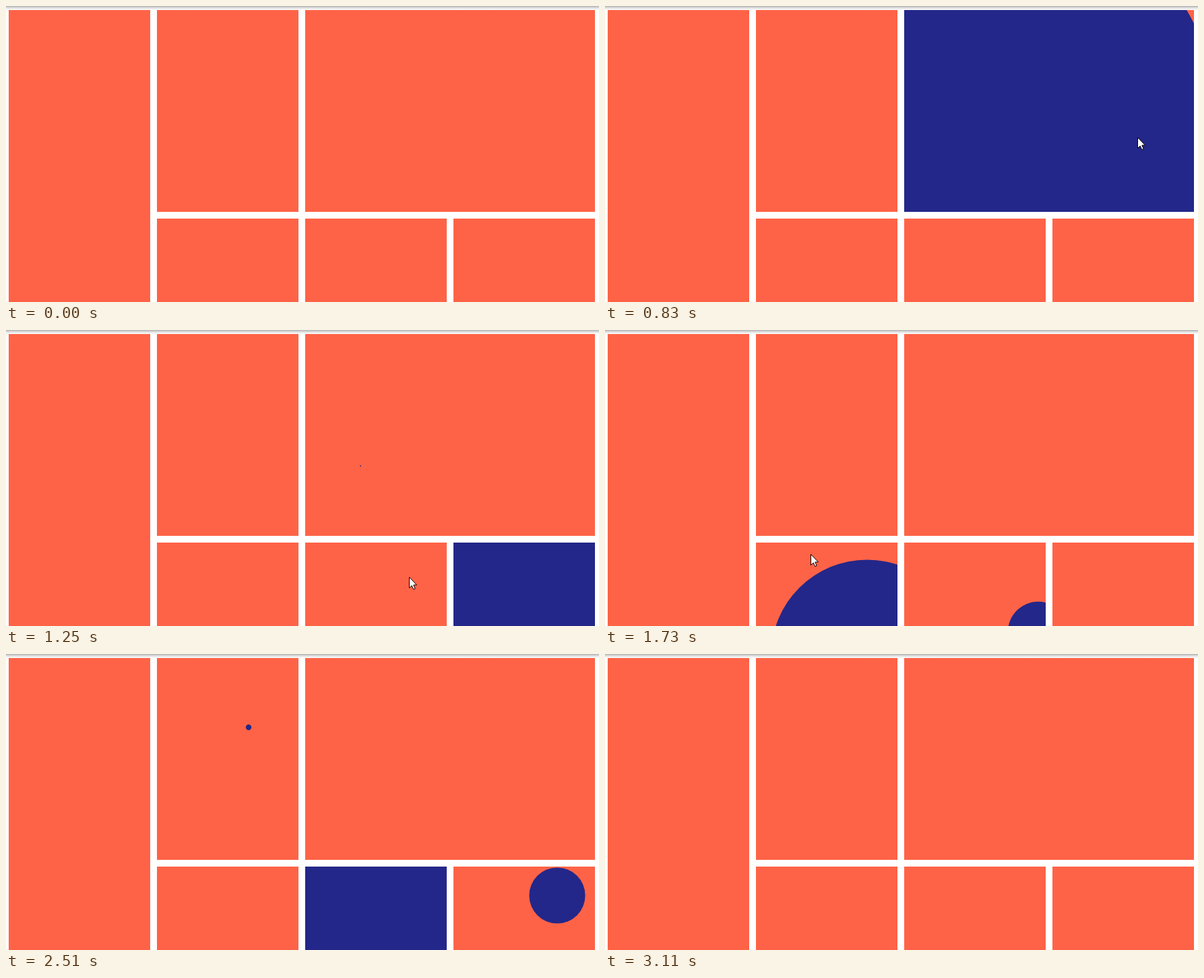
Recreate the animation shown at these times as an HTML page with a canvas. Size 880 by 440 pixels, loop 3.36 s.

```html
<!DOCTYPE html>
<html lang="en">
<head>
<meta charset="utf-8">
<title>Hover tiles</title>
<style>
  html, body { margin: 0; width: 100%; height: 100%; overflow: hidden; background: #fff; }
  canvas { display: block; }
</style>
</head>
<body>
<canvas id="stage" width="880" height="440"></canvas>
<script>
const ctx = document.getElementById('stage').getContext('2d');
const LOOP = 3360, GROW = 300, STEP = 30, PHASE = 20;
const TILE = '#ff6347', FILL = '#232789';

// columns repeat every 220 px, rows every 310 px; the lower row runs past the stage
const tile = (col, row, span = 1, h = row ? 210 : 300) =>
  ({ x: 4 + 220 * col, y: 6 + 310 * row, w: 220 * span - 10, h });

const tiles = [tile(0, 0, 1, 520), tile(1, 0), tile(2, 0, 2)];
for (let col = 1; col < 4; col++) tiles.push(tile(col, 1));

const tileAt = (px, py) =>
  tiles.find(({ x, y, w, h }) => px >= x && px < x + w && py >= y && py < y + h);

// each circle opens where the pointer came in and closes after its stay
const hover = (x, y, enter, stay) => ({ x, y, enter, stay, box: tileAt(x, y) });
const hovers = [
  hover(526, 202, 696, 272),
  hover(800, 368, 1020, 175),
  hover(643, 449, 1245, 320),
  hover(389, 484, 1645, 90),
  hover(360, 109, 1943, 309),
  hover(608, 378, 2262, 200),
  hover(818, 359, 2472, 308)
];

// pointer strokes: key points at even time steps, joined by a smooth curve
const strokes = [
  { start: 550, step: 140, points: [[455, 208], [540, 203], [790, 195], [860, 310],
    [780, 385], [598, 367], [560, 450]] },
  { start: 1580, step: 150, points: [[440, 470], [305, 333], [355, 110], [270, 177],
    [350, 275], [590, 372], [850, 450]] }
];

// cubic-bezier(.25, .1, .25, 1)
function ease(x) {
  if (x <= 0) return 0;
  if (x >= 1) return 1;
  const curve = (s, a, b) => 3 * (1 - s) ** 2 * s * a + 3 * (1 - s) * s * s * b + s ** 3;
  let lo = 0, hi = 1;
  for (let i = 0; i < 24; i++) {
    const mid = (lo + hi) / 2;
    if (curve(mid, .25, .25) < x) lo = mid; else hi = mid;
  }
  return curve(lo, .1, 1);
}

// a circle that turns back early also closes in less time
function openness(age, stay) {
  if (age < stay) return ease(age / GROW);
  const peak = ease(stay / GROW);
  return peak * (1 - ease((age - stay) / (GROW * peak)));
}

function drawHover(t, { x, y, enter, stay, box }) {
  const r = Math.hypot(box.w, box.h) * openness(t - enter, stay);
  if (r < .3) return;
  ctx.save();
  ctx.beginPath();
  ctx.rect(box.x, box.y, box.w, box.h);
  ctx.clip();
  ctx.beginPath();
  ctx.arc(x, y, r, 0, Math.PI * 2);
  ctx.fillStyle = FILL;
  ctx.fill();
  ctx.restore();
}

// Catmull-Rom
const spline = (a, b, c, d, k) =>
  b + k * (c - a + k * (2 * a - 5 * b + 4 * c - d + k * (3 * (b - c) + d - a))) / 2;

function pointOn({ start, step, points }, t) {
  const last = points.length - 1, pos = (t - start) / step;
  if (pos < 0 || pos >= last) return null;
  const i = Math.floor(pos);
  const [a, b, c, d] = [i - 1, i, i + 1, i + 2].map(n => points[Math.max(0, Math.min(last, n))]);
  return [0, 1].map(axis => Math.round(spline(a[axis], b[axis], c[axis], d[axis], pos - i)));
}

const arrow = new Path2D('M.5 .5V16.5L4.2 13 6.8 18.5 9.2 17.5 6.8 12H11.5Z');

function drawPointer(t) {
  for (const stroke of strokes) {
    const tip = pointOn(stroke, t);
    if (!tip) continue;
    ctx.save();
    ctx.translate(...tip);
    ctx.fillStyle = '#fff';
    ctx.strokeStyle = '#000';
    ctx.fill(arrow);
    ctx.stroke(arrow);
    ctx.restore();
  }
}

const shade = ctx.createLinearGradient(0, 0, 0, 6);
shade.addColorStop(0, '#b0b0b0');
shade.addColorStop(.5, '#e2e2e2');
shade.addColorStop(1, '#fff');

function draw(t) {
  ctx.fillStyle = '#fff';
  ctx.fillRect(0, 0, 880, 440);
  ctx.fillStyle = shade;
  ctx.fillRect(0, 0, 880, 6);
  ctx.fillStyle = TILE;
  for (const { x, y, w, h } of tiles) ctx.fillRect(x, y, w, h);
  for (const h of hovers) drawHover(t, h);
  drawPointer(t);
}

const snap = t => Math.floor((t - PHASE) / STEP) * STEP + PHASE;

const began = performance.now();
function tick() {
  draw(snap((performance.now() - began) % LOOP));
  requestAnimationFrame(tick);
}
tick();
</script>
</body>
</html>
```
